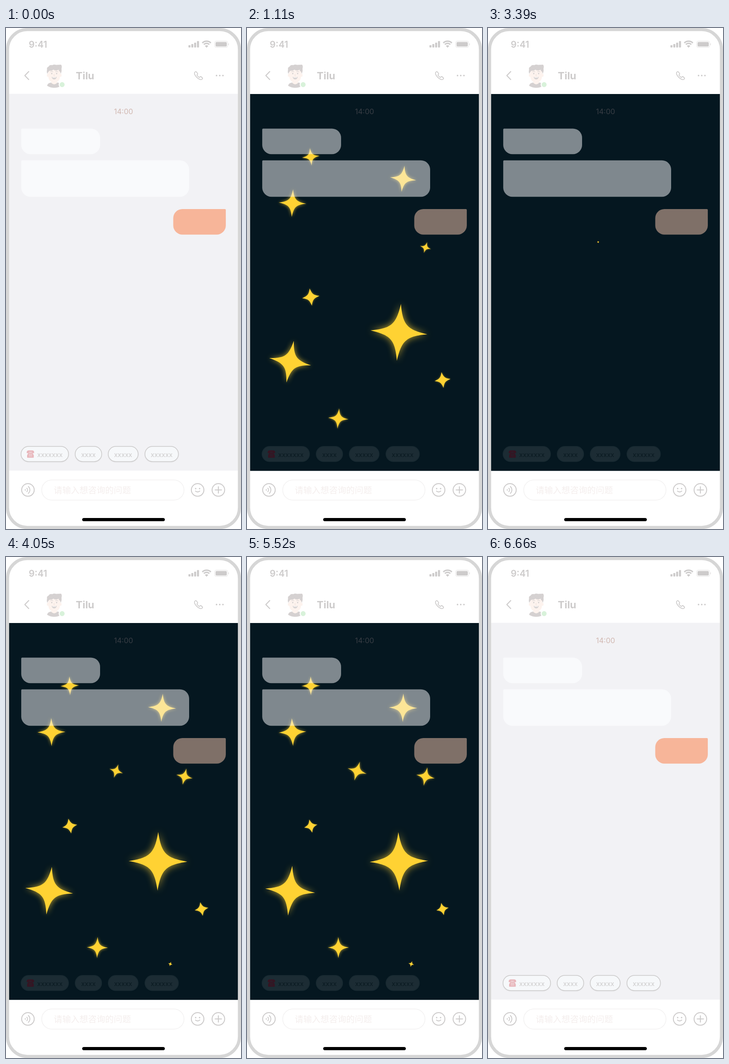
Recreate the animation shown at these times as an HTML page with a canvas. Size 512x1093 px, loop 6.69 s.

```html
<!DOCTYPE html>
<html lang="zh">
<head>
<meta charset="utf-8">
<title>Chat stars</title>
<style>
html, body { margin: 0; width: 100%; height: 100%; overflow: hidden; background: #fff; }
canvas { display: block; width: 512px; height: 1093px; }
</style>
</head>
<body>
<canvas id="stage"></canvas>
<script>
const W = 512, H = 1093, LOOP = 6690, STEP = 30;
const FADE = 360, FADE_OUT = 6300;
const BURST_START = 390, BURST_GAP = 1500, BURST_COUNT = 4, BURST_LENGTH = 1200;
const STAR_LIFE = 700;
const GREY = '#cdcbcb';

// x, y, peak radius, delay, spin direction
const STARS = [
  [240, 467, 44, -2, 1],
  [358, 888, 12, 10, 1],
  [389, 479, 27, 80, 1],
  [94, 728, 57, 195, 1],
  [340, 329, 31, 258, 1],
  [139, 281, 20.4, 265, -1],
  [199, 852, 23, 285, 1],
  [331, 664, 64, 300, 1],
  [99, 382, 30.5, 325, 1],
  [139, 587, 21, 500, 1],
  [426, 768, 19.3, 500, 1]
];

const canvas = document.getElementById('stage');
const ctx = canvas.getContext('2d');
const dpr = window.devicePixelRatio || 1;
canvas.width = W * dpr;
canvas.height = H * dpr;

const clamp = v => Math.min(1, Math.max(0, v));
const smooth = v => { v = clamp(v); return v * v * (3 - 2 * v); };
const mix = (a, b, k) => `rgb(${a.map((v, i) => v + (b[i] - v) * k).join(',')})`;

function box(x, y, w, h, r, fill, stroke, line = 1.5) {
  ctx.beginPath();
  ctx.roundRect(x, y, w, h, r);
  paint(fill, stroke, line);
}

function circle(x, y, r, fill, stroke, line = 2) {
  ctx.beginPath();
  ctx.arc(x, y, r, 0, Math.PI * 2);
  paint(fill, stroke, line);
}

function oval(x, y, rx, ry, fill) {
  ctx.beginPath();
  ctx.ellipse(x, y, rx, ry, 0, 0, Math.PI * 2);
  paint(fill);
}

function path(d, fill, stroke, line = 2) {
  const shape = new Path2D(d);
  if (fill) { ctx.fillStyle = fill; ctx.fill(shape); }
  if (stroke) { ctx.strokeStyle = stroke; ctx.lineWidth = line; ctx.stroke(shape); }
}

function paint(fill, stroke, line) {
  if (fill) { ctx.fillStyle = fill; ctx.fill(); }
  if (stroke) { ctx.strokeStyle = stroke; ctx.lineWidth = line; ctx.stroke(); }
}

function label(text, x, y, font, color, align = 'left') {
  ctx.font = font;
  ctx.fillStyle = color;
  ctx.textAlign = align;
  ctx.fillText(text, x, y);
}

function drawStatusBar() {
  label('9:41', 49.5, 42.5, '600 20px Inter, sans-serif', GREY);
  [5, 7.5, 10.5, 14].forEach((h, i) => box(397.5 + i * 6.2, 42.5 - h, 4.4, h, 1, GREY));
  ctx.lineCap = 'butt';
  for (const r of [13.2, 8.4]) {
    ctx.beginPath();
    ctx.arc(437, 42, r, -Math.PI * 0.75, -Math.PI * 0.25);
    paint(null, GREY, 3);
  }
  path('M437 43 L433.2 39 Q437 35.8 440.8 39 Z', GREY);
  ctx.lineCap = 'round';
  box(454.5, 28.5, 28.5, 14, 4, null, '#e6e5e5', 1);
  box(456.5, 30.5, 24.5, 10, 2.5, GREY);
  path('M484.3 33 Q487 35.5 484.3 38 Z', '#dedddd');
}

function drawAvatar() {
  const dark = '#d5d1d1', skin = '#fdf3ee';
  path('M89.5 126 Q91 119 100 119 L111 119 Q119 119 120.5 126 Q113 130.5 105 130.5 Q97 130.5 89.5 126 Z', dark);
  path('M99 114 H111 V120 Q105 126 99 120 Z', skin);
  oval(91.5, 103, 2.6, 3.6, skin);
  oval(118.5, 103, 2.6, 3.6, skin);
  path('M92 92 H118 V104 Q117 119 105 119 Q93 119 92 104 Z', skin);
  path('M90 100 Q88 95 89.5 91 Q88 86 93 84 Q95 79.5 101 81 Q105 79 109 80.5 L120 80 Q122.5 83 121 88 Q122 94 119.5 100 L117.5 95 Q115 94 114.5 91 Q109 94.5 103 91 Q100 94 95 93 Q92 95 90 100 Z', dark);
  circle(99.7, 99.5, 1.4, dark);
  circle(110.3, 99.5, 1.4, dark);
  path('M97 95.6 Q99.5 94 102 95.4 M108 95.4 Q110.5 94 113 95.6', null, dark, 1.1);
  path('M105 101 Q103.3 104 105.5 104.3', null, '#ecdcd6', 1);
  path('M99.5 106.5 Q105 108.2 110.5 106.5 Q109.5 112 105 112 Q100.5 112 99.5 106.5 Z', dark);
  path('M101 107.2 Q105 108.4 109 107.2 L108.5 108.8 H101.5 Z', '#fff');
  circle(122.3, 123.5, 7.6, '#fff');
  circle(122.3, 123.5, 5.4, '#d8f2da');
}

function drawHeader() {
  ctx.lineCap = ctx.lineJoin = 'round';
  path('M49.5 95 L41 103.7 L49.5 112.4', null, GREY, 2.1);
  drawAvatar();
  label('Tilu', 152, 111.5, '700 22px Inter, sans-serif', GREY);
  path('M411.3 96.5 Q413 94.7 414.3 95.2 L417.6 99.5 Q418 100.7 416 102.5 Q417.5 106 421.3 108 Q423.3 105.6 424.6 106 L428 109 Q428.8 110.5 426.5 112.3 Q424 113.5 419.5 110.8 Q414.5 107.5 412 103 Q409.7 98.8 411.3 96.5 Z', null, GREY, 1.7);
  for (const x of [458.7, 465.7, 472.7]) circle(x, 103.7, 1.7, GREY);
}

function drawStar(x, y, size, delay, spin, t) {
  const p = (t - delay) / STAR_LIFE;
  if (p <= 0 || p >= 1) return;
  const scale = Math.sin(Math.PI * p) ** 0.6;
  const r = size * scale;
  // young stars are plump, then sharpen
  const young = 1 - smooth((p - 0.25) / 0.25);
  const a = r * (0.12 + 0.09 * young), b = r * (0.27 + 0.07 * young);
  ctx.save();
  ctx.translate(x, y);
  ctx.rotate(spin * (40 * p - 20) * Math.PI / 180);
  ctx.shadowColor = `rgba(255,210,51,${0.75 - 0.35 * young})`;
  ctx.shadowBlur = r * 0.26 * dpr;
  ctx.beginPath();
  ctx.moveTo(0, -r);
  ctx.bezierCurveTo(a, -b, b, -a, r, 0);
  ctx.bezierCurveTo(b, a, a, b, 0, r);
  ctx.bezierCurveTo(-a, b, -b, a, -r, 0);
  ctx.bezierCurveTo(-b, -a, -a, -b, 0, -r);
  paint('#ffd233');
  ctx.restore();
}

function drawStars(t) {
  const since = t - BURST_START;
  if (since < 0 || since >= BURST_GAP * BURST_COUNT) return;
  const local = since % BURST_GAP;
  if (local < BURST_LENGTH) STARS.forEach(s => drawStar(...s, local));
}

function drawTelephone(color, hole) {
  path('M45.2 927.5 Q44.5 922 49 921.6 H57.4 Q62 922 61.2 927.5 H57 Q57.4 925 55.6 925 H50.8 Q49 925 49.4 927.5 Z', color);
  path('M49.5 926 H57 L60.5 932 V936.5 Q60.5 937.5 59.5 937.5 H47 Q46 937.5 46 936.5 V932 Z', color);
  for (let i = 0; i < 9; i++) {
    box(50 + (i % 3) * 2.6, 928.5 + Math.floor(i / 3) * 2.4, 1.4, 1.2, 0.3, hole);
  }
}

function drawPills(k) {
  const fill = mix([246, 248, 250], [28, 44, 52], k);
  const edge = mix([204, 203, 203], [23, 41, 49], k);
  const ink = mix([204, 203, 203], [10, 26, 33], k);
  const pills = [[32.7, 103.6, 68, 7], [150.7, 57.8, 163.7, 4], [222.7, 65.2, 235.4, 5], [302.7, 73, 315.3, 6]];
  for (const [x, w, tx, n] of pills) {
    ctx.save();
    ctx.shadowColor = 'rgba(0,0,0,.08)';
    ctx.shadowBlur = 3 * dpr;
    ctx.shadowOffsetY = dpr;
    box(x, 912.8, w, 33.2, 16.6, fill);
    ctx.restore();
    box(x, 912.8, w, 33.2, 16.6, null, edge, 1.5);
    label('x'.repeat(n), tx, 936, '400 14.5px Inter, sans-serif', ink);
  }
  drawTelephone(mix([232, 182, 187], [54, 20, 34], k), fill);
}

function drawChat(t, k) {
  ctx.fillStyle = mix([242, 242, 245], [5, 23, 32], k);
  ctx.fillRect(6, 143.6 + 0.4 * k, 500, 822 + 0.2 * k);
  label('14:00', 256, 187.7, '400 16px Inter, sans-serif', mix([210, 185, 178], [56, 61, 68], k), 'center');
  ctx.save();
  ctx.beginPath();
  ctx.rect(7, 144, 498, 822);
  ctx.clip();
  drawStars(t);
  ctx.restore();
  const glass = `rgba(249,250,252,${1 - 0.5 * k})`;
  box(33.2, 219.5, 171.8, 55.7, [2, 20, 20, 20], glass);
  box(33.2, 288.8, 365.8, 79.4, [2, 20, 20, 20], glass);
  box(364.4, 395, 114.5, 55.7, [20, 2, 20, 20], mix([247, 181, 153], [127, 112, 104], k));
  drawPills(k);
}

function drawInputBar() {
  circle(47.8, 1007.8, 13.7, null, GREY);
  circle(42, 1007.8, 1.4, GREY);
  for (const r of [5, 10]) {
    ctx.beginPath();
    ctx.arc(42, 1007.8, r, -0.85, 0.85);
    paint(null, GREY, 1.8);
  }
  box(77.8, 986, 310, 44, 22, '#fff', '#f3f2f2', 1.5);
  label('请输入想咨询的问题', 104, 1014.5, '400 18.7px "Noto Sans CJK SC", "Noto Sans CJK", sans-serif', '#f4eeed');
  circle(417.5, 1007.8, 13.7, null, GREY);
  circle(413.2, 1004.8, 1.6, GREY);
  circle(421.8, 1004.8, 1.6, GREY);
  path('M412.8 1010.3 Q417.5 1014 422.2 1010.3', null, GREY, 1.9);
  circle(462.7, 1007.8, 13.7, null, GREY);
  path('M455.7 1007.8 H469.7 M462.7 1000.8 V1014.8', null, GREY, 2.1);
  box(166, 1069, 180, 7, 3.5, '#000');
}

function draw(t) {
  const k = smooth(t / FADE) * (1 - smooth((t - FADE_OUT) / FADE));
  ctx.setTransform(dpr, 0, 0, dpr, 0, 0);
  ctx.fillStyle = '#fff';
  ctx.fillRect(0, 0, W, H);
  drawStatusBar();
  drawHeader();
  drawChat(t, k);
  drawInputBar();
  box(3.4, 3.4, W - 6.8, H - 6.8, 43, null, '#d6d6d6', 6.8);
}

const start = performance.now();
function tick() {
  const t = (performance.now() - start) % LOOP;
  draw(Math.floor(t / STEP) * STEP);
  requestAnimationFrame(tick);
}
tick();
</script>
</body>
</html>
```
